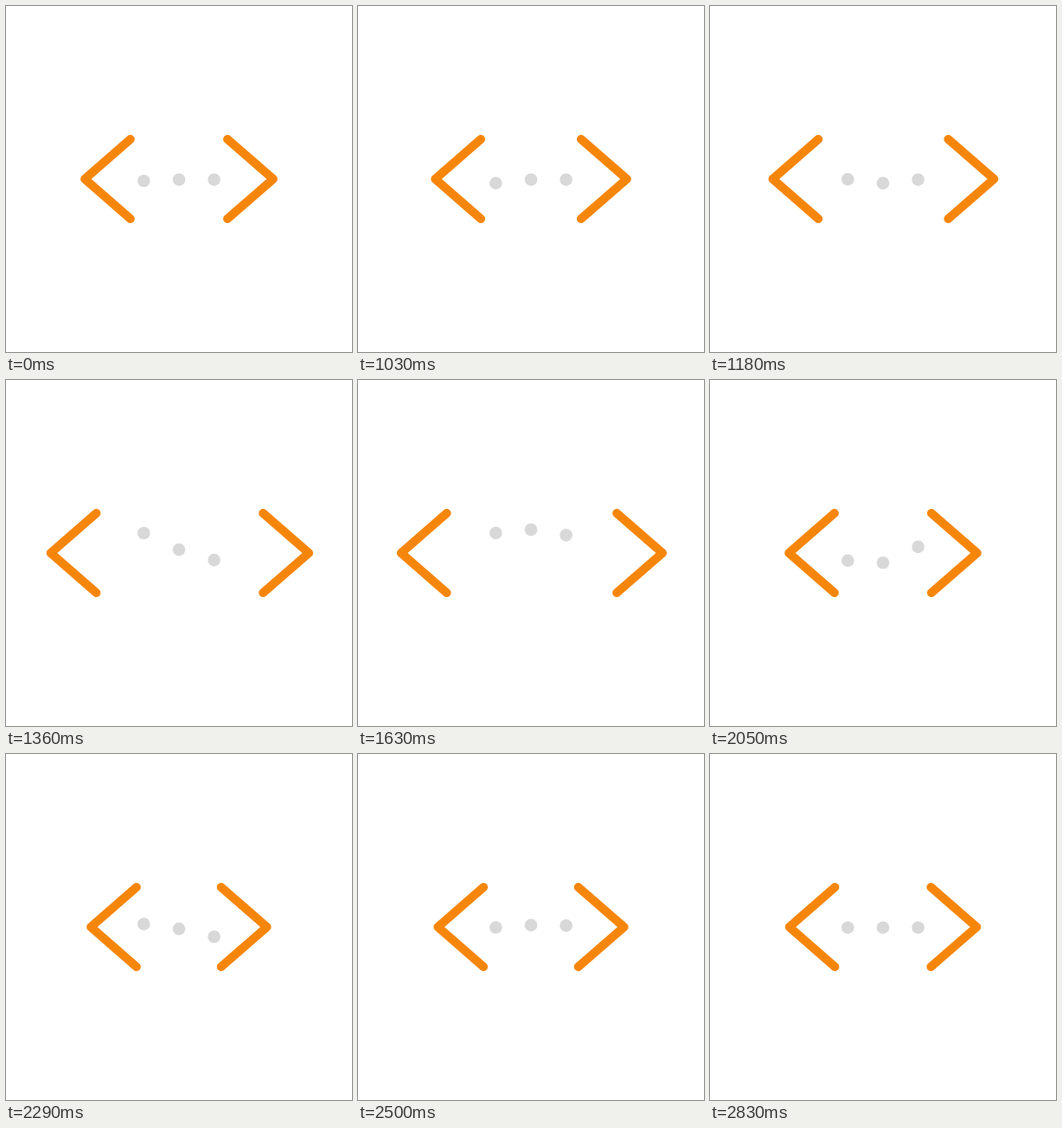
Recreate the animation shown at these times as an HTML page. Size 400x400 px, loop 2920 ms.

```html
<!DOCTYPE html>
<html lang="en">
<head>
<meta charset="utf-8">
<title>Code brackets loader</title>
<style>
  html, body { margin: 0; width: 100%; height: 100%; overflow: hidden; background: #fff; }
  svg { display: block; width: 100vw; height: 100vh; }
  .bracket { fill: none; stroke: #f6860a; stroke-width: 10; stroke-linecap: round; stroke-linejoin: round; }
  .dot { fill: #d8d8d8; }
</style>
</head>
<body>
<svg viewBox="0 0 400 400">
  <path class="bracket" id="left" d="M144.4 154L91.7 200L144.4 246"/>
  <path class="bracket" id="right" d="M255.4 154L308.3 200L255.4 246"/>
  <circle class="dot" cx="159.3" cy="200.7" r="7.3"/>
  <circle class="dot" cx="200" cy="200.7" r="7.3"/>
  <circle class="dot" cx="240.6" cy="200.7" r="7.3"/>
</svg>
<script>
const LOOP = 2920, HOLD = 1000, STEP = 30, LAST = 61, STAGGER = 5;

// Keys are [step, offset]; offsets are outward for brackets, downward for dots.
const spread = curve([
  [-1, 0], [0, 0.6], [1, 2.4], [4, 11], [8, 27.5], [12, 40], [16, 42.5], [20, 42.2],
  [24, 38.9], [28, 28.7], [35, 0.5], [40, -7], [43, -6.4], [52, 0]
]);
const bounce = curve([
  [-1, 0], [0, 1.5], [1, 4.2], [2, 7.4], [3.2, 8.8], [7, -4.6], [12, -23.7], [16.5, -27.8],
  [20, -25.4], [23, -18.2], [25, -7.8], [28, 4.6], [31, 11.7], [35, 8.2], [38, 1.4],
  [42, -4.3], [46, -2.2], [51, 0]
]);

// Monotone cubic curve through the keys, flat at the turning points.
function curve(keys) {
  const slopes = keys.slice(1).map(([x, y], i) => (y - keys[i][1]) / (x - keys[i][0]));
  const tangents = keys.map((_, i) => {
    const a = slopes[i - 1] || 0, b = slopes[i] || 0;
    return a * b > 0 ? 2 * a * b / (a + b) : 0;
  });
  return x => {
    if (x <= keys[0][0]) return keys[0][1];
    const i = keys.findIndex(key => key[0] >= x) - 1;
    if (i < 0) return keys[keys.length - 1][1];
    const [x0, y0] = keys[i], [x1, y1] = keys[i + 1];
    const w = x1 - x0, u = (x - x0) / w, v = 1 - u;
    return y0 * v * v * (1 + 2 * u) + y1 * u * u * (1 + 2 * v)
      + w * u * v * (tangents[i] * v - tangents[i + 1] * u);
  };
}

const left = document.getElementById('left');
const right = document.getElementById('right');
const dots = document.querySelectorAll('.dot');
const move = (node, x, y) => node.setAttribute('transform', `translate(${x} ${y})`);

function draw(time) {
  const step = Math.min(LAST, Math.max(0, Math.floor((time % LOOP - HOLD) / STEP)));
  const offset = spread(step);
  move(left, -offset, 0);
  move(right, offset * 1.045, 0);
  dots.forEach((dot, i) => move(dot, 0, bounce(step - i * STAGGER)));
}

const start = performance.now();
function tick(now) {
  draw(Math.max(0, now - start));
  requestAnimationFrame(tick);
}
draw(0);
requestAnimationFrame(tick);
</script>
</body>
</html>
```
